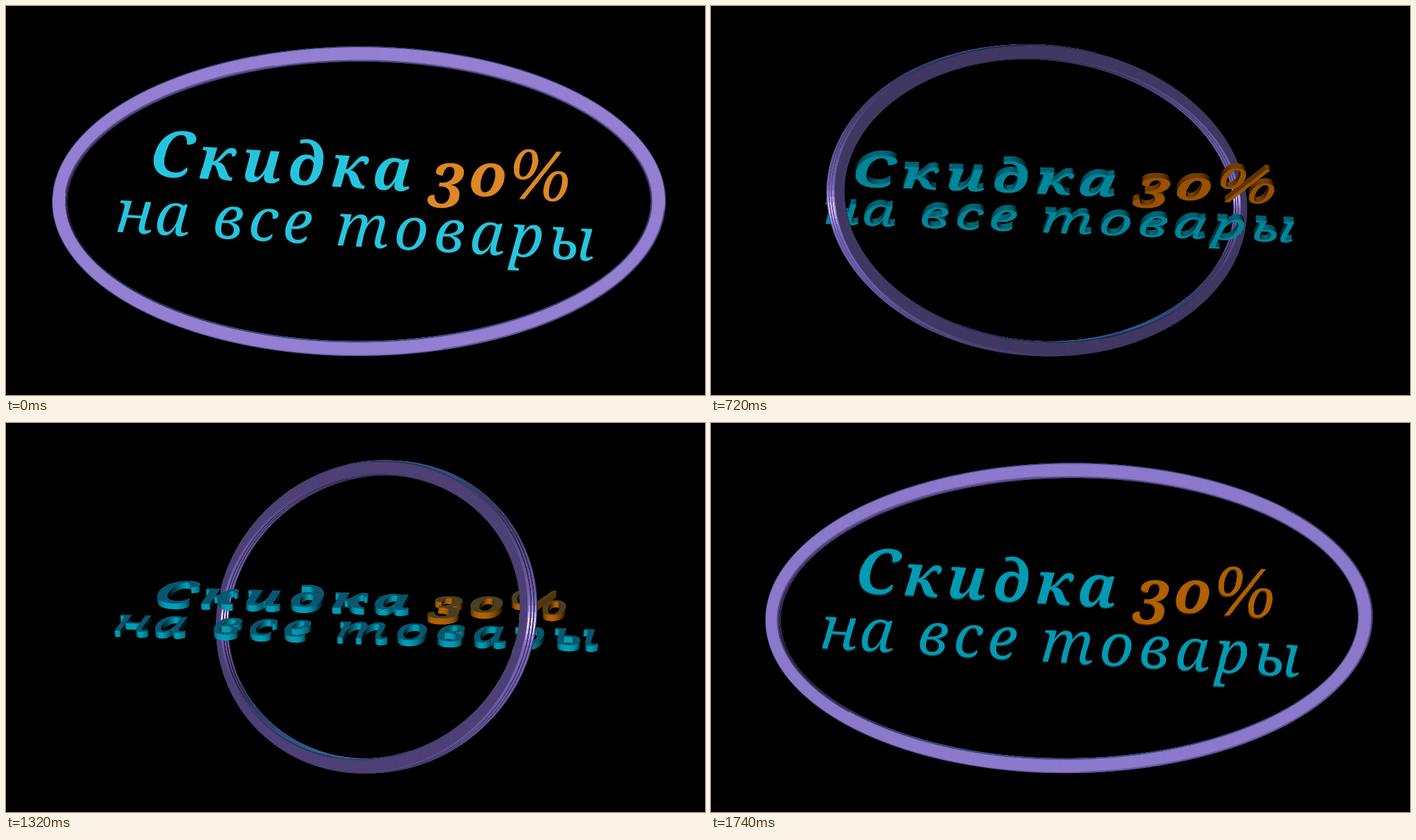
Animation, 1003 px wide and 559 px high, one loop 1800 ms. Source, as an HTML page with a canvas:

```html
<!DOCTYPE html>
<html lang="ru">
<head>
<meta charset="utf-8">
<title>Скидка 30% на все товары</title>
<style>
  html, body { margin: 0; width: 100%; height: 100%; overflow: hidden; background: #000; }
  canvas { display: block; }
</style>
</head>
<body>
<canvas id="stage" width="1003" height="559"></canvas>
<script>
const W = 1003, H = 559, CX = 504, CY = 280, DIST = 2836;
const LOOP = 1800, HOLD = 360, STEP = 60, STEPS = 25;
const rad = d => d * Math.PI / 180;
const dot = (a, b) => a[0] * b[0] + a[1] * b[1] + a[2] * b[2];

// Axes: x right, y up, z toward the viewer
const aim = (az, el) => [
  Math.sin(rad(az)) * Math.cos(rad(el)),
  Math.sin(rad(el)),
  Math.cos(rad(az)) * Math.cos(rad(el))
];
const KEY = aim(-9, -12), GLINT = aim(-4.5, -6.5), SKY = aim(0, 109);

const CYAN = { base: [0, 166, 192], sky: [42, 155, 235], gloss: 255 };
const ORANGE = { base: [190, 102, 0], sky: [64, 144, 150], gloss: 255 };
const VIOLET = { base: [123, 104, 189], sky: [55, 155, 240], gloss: 140 };

function shade(n, mat) {
  const d = Math.max(0, dot(n, KEY));
  const s = mat.gloss * Math.pow(Math.max(0, dot(n, GLINT)), 129);
  const b = Math.min(1, Math.pow(Math.max(0, dot(n, SKY)), 5) / 0.53);
  return mat.base.map((c, i) => Math.min(255, Math.round(c * d + s + mat.sky[i] * b)));
}

function makeCanvas(w, h) {
  const c = document.createElement('canvas');
  c.width = w;
  c.height = h;
  return c;
}

/* ---------- lettering ---------- */
const S = 2, TOP = 160, BAND = 250, DEPTH = 10, ROLL = rad(3.5), BINS = 64;
const TW = W * S, TH = BAND * S;

// text, weight, ink left, ink right, baseline or bottom, glyph height (0: by x-height)
const RUNS = [
  ['С', 700, 207, 270, 263, 69],
  ['кидка', 700, 275.5, 578, 261.5, 0],
  ['3', 700, 605, 653, 283, 66],
  ['о', 700, 664, 714, 263, 49],
  ['%', 400, 725, 804, 264, 74],
  ['на', 400, 163.4, 265.4, 345.5, 0],
  ['все', 400, 302.8, 441, 345.5, 0],
  ['товары', 400, 479, 846, 345.5, 0]
];
const XHEIGHT = 46;

function pickFamily(g) {
  const wide = style => {
    g.font = style + '100px "Noto Serif", serif';
    return g.measureText('т').width;
  };
  const trueItalic = Math.abs(wide('italic ') - wide('')) > 1;
  return trueItalic ? '"Noto Serif", serif' : '"Liberation Serif", serif';
}

function drawRun(g, family, [str, weight, left, right, base, height]) {
  const setFont = size => { g.font = `italic ${weight} ${size}px ${family}`; };
  g.letterSpacing = '0px';
  setFont(100);
  if (height) {
    let m = g.measureText(str);
    setFont(100 * height / (m.actualBoundingBoxAscent + m.actualBoundingBoxDescent));
    m = g.measureText(str);
    const ink = m.actualBoundingBoxLeft + m.actualBoundingBoxRight;
    g.fillText(str, (left + right - ink) / 2 + m.actualBoundingBoxLeft, base - m.actualBoundingBoxDescent);
    return;
  }
  setFont(100 * XHEIGHT / g.measureText('н').actualBoundingBoxAscent);
  const m = g.measureText(str);
  const ink = m.actualBoundingBoxLeft + m.actualBoundingBoxRight;
  g.letterSpacing = (right - left - ink) / (str.length - 1) + 'px';
  g.fillText(str, left + m.actualBoundingBoxLeft, base);
}

// Coverage of the lettering, plus a code per pixel: material and edge direction
function buildText() {
  const mask = makeCanvas(TW, TH), g = mask.getContext('2d');
  const family = pickFamily(g);
  g.scale(S, S);
  g.translate(502, 279.5 - TOP);
  g.rotate(ROLL);
  g.translate(-502, -279.5);
  for (const run of RUNS) {
    g.fillStyle = '3о%'.includes(run[0]) ? '#f00' : '#0ff';
    drawRun(g, family, run);
  }
  const soft = makeCanvas(TW, TH), sg = soft.getContext('2d');
  sg.filter = 'blur(2px)';
  sg.drawImage(mask, 0, 0);

  const src = g.getImageData(0, 0, TW, TH).data;
  const blur = sg.getImageData(0, 0, TW, TH).data;
  const near = i => blur[i * 4 + 3] || 0;
  const cover = new Uint8Array(TW * TH), code = new Uint8Array(TW * TH);
  for (let i = 0; i < TW * TH; i++) {
    cover[i] = src[i * 4 + 3];
    if (!cover[i]) continue;
    const gx = near(i + 2) - near(i - 2), gy = near(i + 2 * TW) - near(i - 2 * TW);
    const bin = Math.round(Math.atan2(gy, -gx) / (2 * Math.PI) * BINS) & (BINS - 1);
    code[i] = bin + (src[i * 4] > 127 ? BINS : 0);
  }
  return { cover, code };
}

const text = buildText();
const A = 2, X0 = 130, X1 = 880;

// Casts a ray through the tipped slab of letters for every sub-pixel
function drawText(g, phi) {
  const c = Math.cos(phi), s = Math.sin(phi);
  const faces = [], walls = [];
  for (const mat of [CYAN, ORANGE]) {
    const front = shade([0, -s, c], mat);
    for (let j = 0; j < BINS; j++) {
      const t = j / BINS * 2 * Math.PI, up = Math.sin(t);
      faces.push(front);
      walls.push(shade([Math.cos(t), up * c, up * s], mat));
    }
  }

  const screenY = (u, w) => CY - (u * c - w * s) * DIST / (DIST - u * s - w * c);
  const ends = [];
  for (const u of [CY - TOP, CY - TOP - BAND]) {
    for (const w of [-DEPTH / 2, DEPTH / 2]) ends.push(screenY(u, w));
  }
  const y0 = Math.floor(Math.min(...ends)), y1 = Math.ceil(Math.max(...ends));
  const cw = (X1 - X0) * A, ch = (y1 - y0) * A;
  const out = makeCanvas(cw, ch), og = out.getContext('2d');
  const img = og.createImageData(cw, ch), px = img.data;
  const n = Math.min(260, Math.ceil(DEPTH * Math.abs(s / c) * S) + 1);

  for (let r = 0; r < ch; r++) {
    const q = CY - y0 - (r + 0.5) / A;
    const hits = [];
    for (let i = 0; i <= n; i++) {
      const w = DEPTH * (0.5 - i / n);
      const u = (q * (DIST - w * c) + DIST * w * s) / (DIST * c + q * s);
      const row = Math.floor((CY - u - TOP) * S);
      if (row < 0 || row >= TH) continue;
      hits.push({ at: row * TW, scale: (DIST - u * s - w * c) / DIST, lut: i ? walls : faces });
    }
    for (let x = 0; x < cw; x++) {
      const dx = X0 + (x + 0.5) / A - CX;
      let sum = 0, red = 0, green = 0, blue = 0;
      for (let i = 0; i < hits.length && sum < 250; i++) {
        const h = hits[i];
        const p = h.at + ((CX + dx * h.scale) * S | 0);
        const gain = text.cover[p] - sum;
        if (gain <= 0) continue;
        const col = h.lut[text.code[p]];
        red += col[0] * gain;
        green += col[1] * gain;
        blue += col[2] * gain;
        sum += gain;
      }
      if (!sum) continue;
      const o = (r * cw + x) * 4;
      px[o] = red / sum;
      px[o + 1] = green / sum;
      px[o + 2] = blue / sum;
      px[o + 3] = sum;
    }
  }
  og.putImageData(img, 0, 0);
  g.drawImage(out, X0, y0, X1 - X0, y1 - y0);
}

/* ---------- ring ---------- */
const RX = 440, RY = 222, BAR = 20, HALF = 7, BACK = 3, PITCH = rad(2.2), SEGS = 200, RIB = 18;

// Cross-section as [inset, depth]: ribbed outer wall, then ribbed inner wall
const profile = [];
for (let i = 0; i <= RIB; i++) {
  const bulge = Math.abs(Math.sin(3 * Math.PI * i / RIB));
  profile.push([1.5 - 1.5 * bulge, HALF * (2 * i / RIB - 1)]);
}
for (let i = RIB; i >= 0; i--) profile.push([BAR - profile[i][0], profile[i][1]]);

function ringQuads(theta) {
  const c = Math.cos(theta), s = Math.sin(theta), cp = Math.cos(PITCH), sp = Math.sin(PITCH);
  const turn = ([x, y, z]) => {
    const d = z * c - x * s;
    return [x * c + z * s, y * cp + d * sp, d * cp - y * sp];
  };
  const outward = t => {
    const nx = RY * Math.cos(t), ny = RX * Math.sin(t), l = Math.hypot(nx, ny);
    return [nx / l, ny / l];
  };
  const rows = [];
  for (let i = 0; i <= SEGS; i++) {
    const t = i / SEGS * 2 * Math.PI, [nx, ny] = outward(t);
    rows.push(profile.map(([o, w]) => turn([RX * Math.cos(t) - nx * o, RY * Math.sin(t) - ny * o, w - BACK])));
  }
  const quads = [];
  for (let i = 0; i < SEGS; i++) {
    const [nx, ny] = outward((i + 0.5) / SEGS * 2 * Math.PI);
    for (let j = 0; j < profile.length; j++) {
      const k = (j + 1) % profile.length;
      const dr = profile[j][0] - profile[k][0], dw = profile[k][1] - profile[j][1];
      const l = Math.hypot(dr, dw);
      const n = turn([nx * dw / l, ny * dw / l, -dr / l]);
      const pts = [rows[i][j], rows[i][k], rows[i + 1][k], rows[i + 1][j]];
      const p = pts[0];
      if (dot(n, [-p[0], -p[1], DIST - p[2]]) <= 0) continue;
      const z = pts.reduce((sum, q) => sum + q[2], 0) / 4;
      quads.push({ pts, z, fill: `rgb(${shade(n, VIOLET)})` });
    }
  }
  return quads.sort((a, b) => a.z - b.z);
}

function drawQuads(g, quads) {
  g.lineWidth = 1;
  g.lineJoin = 'round';
  for (const { pts, fill } of quads) {
    g.beginPath();
    for (const [x, y, z] of pts) {
      const k = DIST / (DIST - z);
      g.lineTo(CX + x * k, CY - y * k);
    }
    g.closePath();
    g.fillStyle = g.strokeStyle = fill;
    g.fill();
    g.stroke();
  }
}

/* ---------- playback ---------- */
const poses = [];

function render(step) {
  const canvas = makeCanvas(W, H), g = canvas.getContext('2d');
  const deg = step * 180 / STEPS - 2.2;
  const quads = ringQuads(rad(deg));
  g.fillStyle = '#000';
  g.fillRect(0, 0, W, H);
  drawQuads(g, quads.filter(q => q.z < 0));
  drawText(g, rad(deg > 90 ? deg - 180 : deg));
  drawQuads(g, quads.filter(q => q.z >= 0));
  return canvas;
}

const pose = step => poses[step] = poses[step] || render(step);
const stage = document.getElementById('stage').getContext('2d');
let start = null, shown = -1, ready = 0;

function tick(now) {
  if (start === null) start = now;
  const t = (now - start) % LOOP;
  const step = t < HOLD ? 0 : Math.min(STEPS - 1, 1 + Math.floor((t - HOLD) / STEP));
  if (step !== shown) {
    stage.drawImage(pose(step), 0, 0);
    shown = step;
  } else if (ready < STEPS) {
    pose(ready++); // prepare later poses while the picture holds
  }
  requestAnimationFrame(tick);
}
requestAnimationFrame(tick);
</script>
</body>
</html>
```
